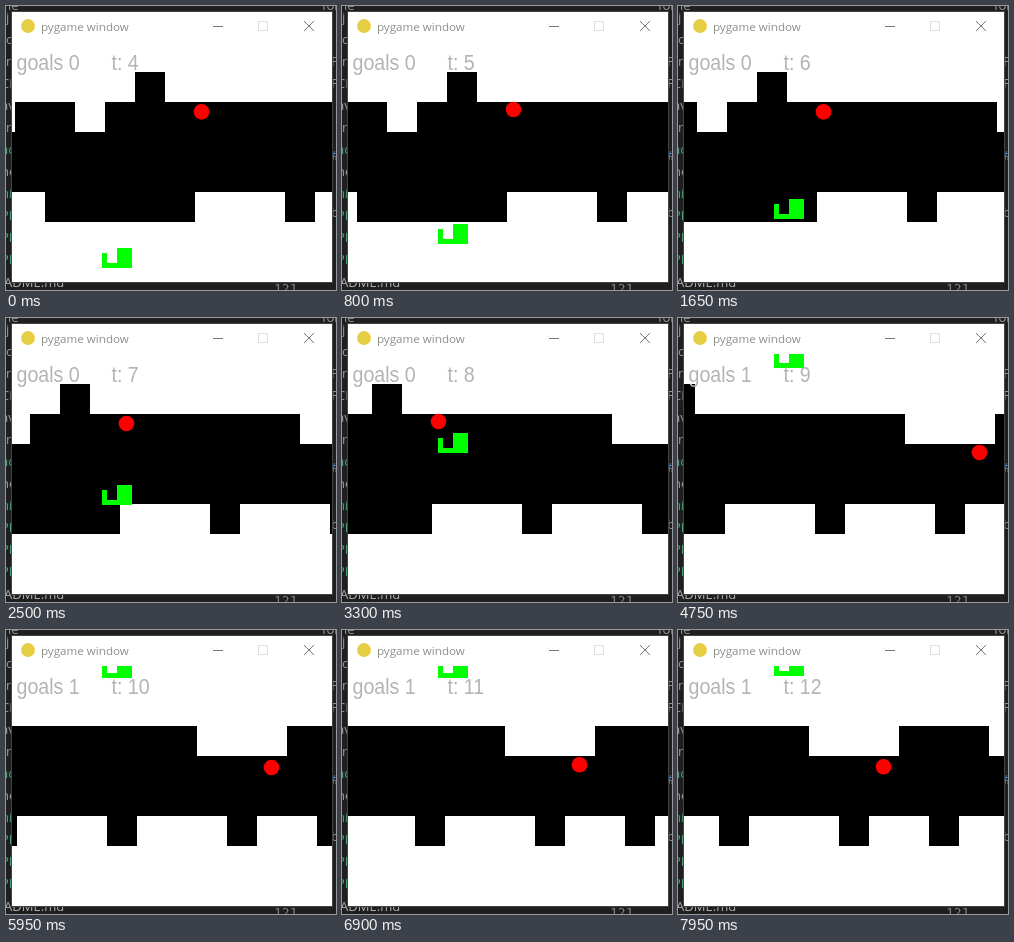
These frames come from a looping animation (330 by 284 pixels, 8000 ms). An HTML page with a canvas:

```html
<!DOCTYPE html>
<html lang="en">
<head>
<meta charset="utf-8">
<title>Cave game</title>
<style>
html, body { margin: 0; width: 100%; height: 100%; overflow: hidden; background: #1f1f1f; }
canvas { display: block; }
</style>
</head>
<body>
<canvas id="stage" width="330" height="284"></canvas>
<script>
const ctx = document.getElementById('stage').getContext('2d');
const LOOP = 8000, STEP = 50, TILE = 30;
const VIEW = { x: 6, y: 36, w: 320, h: 240 };

// Tile rows by their top edge; # is wall
const MAP_LEFT = -21;
const MAP = {
  66: '#####.##############',
  96: '#..#.........###...#',
  186: '##.....###.###.##.##'
};

// Goals bob around y, highest offset at time peak
const GOALS = [
  { x: 195.5, y: 105, peak: 2025 },
  { x: 443.5, y: 106, peak: 5950 }
];
const EATEN = 3400, BOB = 2400;

function rect(color, x, y, w, h) {
  ctx.fillStyle = color;
  ctx.fillRect(x, y, w, h);
}

function frame(color, x, y, w, h) {
  ctx.strokeStyle = color;
  ctx.strokeRect(x, y, w, h);
}

function disc(color, x, y, r) {
  ctx.fillStyle = color;
  ctx.beginPath();
  ctx.arc(x, y, r, 0, Math.PI * 2);
  ctx.fill();
}

function line(color, x0, y0, x1, y1) {
  ctx.strokeStyle = color;
  ctx.beginPath();
  ctx.moveTo(x0, y0);
  ctx.lineTo(x1, y1);
  ctx.stroke();
}

function text(str, x, y, color, size = 13, family = '"Open Sans", sans-serif') {
  ctx.fillStyle = color;
  ctx.font = `${size}px ${family}`;
  ctx.fillText(str, x, y);
}

function drawDesktop() {
  rect('#1f1f1f', 0, 0, 330, 284);
  'j c n CN av n ac ne ni PP PP PP'.split(' ').forEach((word, i) => {
    const green = i === 6 || i > 7;
    text(word, word.length > 1 ? -5 : 0, 16 + i * 22, green ? '#4fa47c' : '#9a9a9a');
  });
  text('ADME.md', -2, 281, '#b0b0b0');
  text('121', 268, 287, '#808080', 13, '"DejaVu Sans Mono", monospace');
  text('le', 2, 4, '#9a9a9a');
  text('for', 316, 4, '#9a9a9a');
  text('F', 325, 60, '#9a9a9a');
  text('F', 325, 82, '#9a9a9a');
  text('#', 325, 154, '#4a7fb0');
  text('b', 325, 211, '#9a9a9a');
}

function drawTitleBar() {
  frame('#444', 5.5, 5.5, 321, 271);
  rect('#fff', 6, 6, 320, 30);
  disc('#e6cf45', 22, 20, 7);
  text('pygame window', 35, 25, '#8c8c8c', 11.6);
  line('#777', 207, 20.5, 217, 20.5);
  frame('#e0e0e0', 252.5, 15.5, 9, 9);
  line('#777', 298, 15, 308, 25);
  line('#777', 308, 15, 298, 25);
}

function drawCave(scroll) {
  rect('#fff', VIEW.x, VIEW.y, VIEW.w, VIEW.h);
  rect('#000', VIEW.x, 66, VIEW.w, 150);
  for (const [top, row] of Object.entries(MAP)) {
    [...row].forEach((tile, i) => {
      if (tile === '#') rect('#fff', MAP_LEFT + i * TILE - scroll, +top, TILE, TILE);
    });
  }
}

function drawGoal({ x, y, peak }, scroll, t) {
  const bob = 1.5 * Math.cos((t - peak) / BOB * Math.PI * 2);
  disc('#f00', x - scroll, y + bob + (peak > EATEN ? TILE : 0), 7.8);
}

// Steady climb, then a boost, then a slow drift against the top
function playerY(t) {
  const climb = 242 - 0.03 * t - 0.06 * Math.max(0, t - 2840);
  const drift = 2 * Math.round(15 - 0.0006 * (t - 4750));
  return Math.max(Math.round(climb), drift);
}

function drawPlayer(y) {
  rect('#0f0', 96, y + 5, 5, 15);
  rect('#0f0', 96, y + 15, 30, 5);
  rect('#0f0', 111, y, 15, 20);
}

function drawScore(str, x) {
  ctx.save();
  ctx.translate(x, 64);
  ctx.scale(1, 1.17);
  text(str, 0, 0, '#b4b4b4', 19.6, '"Liberation Sans", Arial, sans-serif');
  ctx.restore();
}

function draw(t) {
  const scroll = Math.round(t * 0.02988 + 0.2);
  const goals = t < EATEN ? 0 : 1;
  drawDesktop();
  drawTitleBar();
  ctx.save();
  ctx.beginPath();
  ctx.rect(VIEW.x, VIEW.y, VIEW.w, VIEW.h);
  ctx.clip();
  drawCave(scroll);
  drawGoal(GOALS[goals], scroll, t);
  drawPlayer(playerY(t));
  drawScore('goals ' + goals, 10.5);
  drawScore('t: ' + Math.floor(4.85 + t / 1000), 105.5);
  ctx.restore();
}

const start = performance.now();
function tick() {
  const t = (performance.now() - start) % LOOP;
  draw(Math.floor(t / STEP) * STEP);
  requestAnimationFrame(tick);
}
tick();
</script>
</body>
</html>
```
